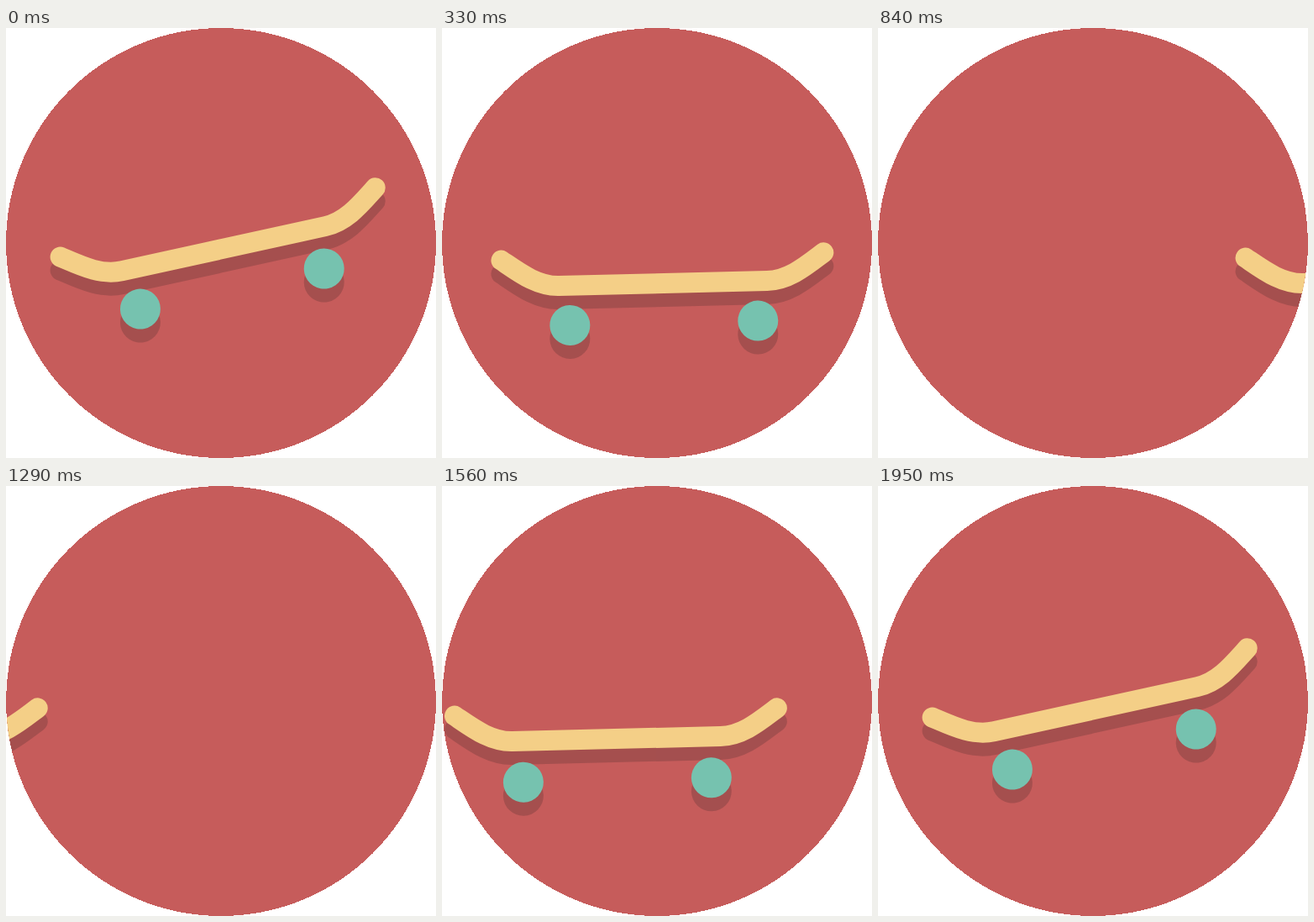
An HTML page that plays this animation: 512x512 px, repeating every 1.98 s.

```html
<!DOCTYPE html>
<html lang="en">
<head>
<meta charset="utf-8">
<title>Skateboard</title>
<style>
  html, body { margin: 0; width: 100%; height: 100%; overflow: hidden; background: #fff; }
  svg { display: block; width: 100%; height: 100%; }
</style>
</head>
<body>
<svg viewBox="0 0 512 512">
  <defs>
    <clipPath id="disc"><circle cx="256" cy="256" r="256"/></clipPath>
    <path id="deckShape" d="M-192-40C-171-25-150-8-124-8H124C150-8 171-25 192-40"
      fill="none" stroke-width="24" stroke-linecap="round"/>
    <g id="wheelShapes"><circle cx="-112" cy="40" r="24"/><circle cx="112" cy="40" r="24"/></g>
  </defs>
  <circle cx="256" cy="256" r="256" fill="#c65c5b" shape-rendering="crispEdges"/>
  <g clip-path="url(#disc)">
    <g id="board">
      <g transform="translate(0 16)" opacity=".2" fill="#231f20">
        <use class="wheels" href="#wheelShapes"/>
        <use class="deck" href="#deckShape" stroke="#231f20"/>
      </g>
      <use class="wheels" href="#wheelShapes" fill="#76c2af"/>
      <use class="deck" href="#deckShape" stroke="#f4cf87"/>
    </g>
  </g>
</svg>
<script>
const LOOP = 1980, STEP = 30, CENTER = 260.75, GONE = 1020, BACK = 1290;

const progress = (t, from, to) => Math.min(1, Math.max(0, (t - from) / (to - from)));

function smooth(t, from, to) {
  const u = progress(t, from, to);
  return u * u * (3 - 2 * u);
}

// Same curve as CSS cubic-bezier(x1, 0, x2, 1), solved by bisection.
function bezierEase(u, x1, x2) {
  let low = 0, high = 1, s = 0.5;
  for (let i = 0; i < 24; i++) {
    s = (low + high) / 2;
    const x = 3 * s * (1 - s) * ((1 - s) * x1 + s * x2) + s ** 3;
    if (x < u) low = s; else high = s;
  }
  return s * s * (3 - 2 * s);
}

const rollOut = t => 487 * bezierEase(progress(t, 226, 1396), 0.75, 0.12);
const rollIn = t => -414 * (1 - progress(t, BACK, 1815)) ** 2.85;

const board = document.getElementById("board");
const wheels = document.querySelectorAll(".wheels");
const decks = document.querySelectorAll(".deck");

function place(parts, x, y, angle) {
  for (const part of parts) part.setAttribute("transform", `translate(${x} ${y}) rotate(${angle})`);
}

function render(t) {
  const raised = 1 - smooth(t, 0, 300);
  const popped = smooth(t, 1570, 1800);
  const height = 38.5 * raised + 35.5 * popped;
  const tilt = -1.38 - 11 * (raised + popped);
  const jolt = Math.exp(-(((t - 330) / 90) ** 2));
  const x = CENTER + (t < BACK ? rollOut(t) : rollIn(t));

  board.setAttribute("visibility", t >= GONE && t < BACK ? "hidden" : "visible");
  place(wheels, x, 310 - height + 1.3 * jolt, tilt);
  place(decks, x, 309 - height + 3 * jolt, tilt);
}

const start = performance.now();
function tick() {
  const t = (performance.now() - start) % LOOP;
  render(Math.floor(t / STEP) * STEP);
  requestAnimationFrame(tick);
}
render(0);
requestAnimationFrame(tick);
</script>
</body>
</html>
```
